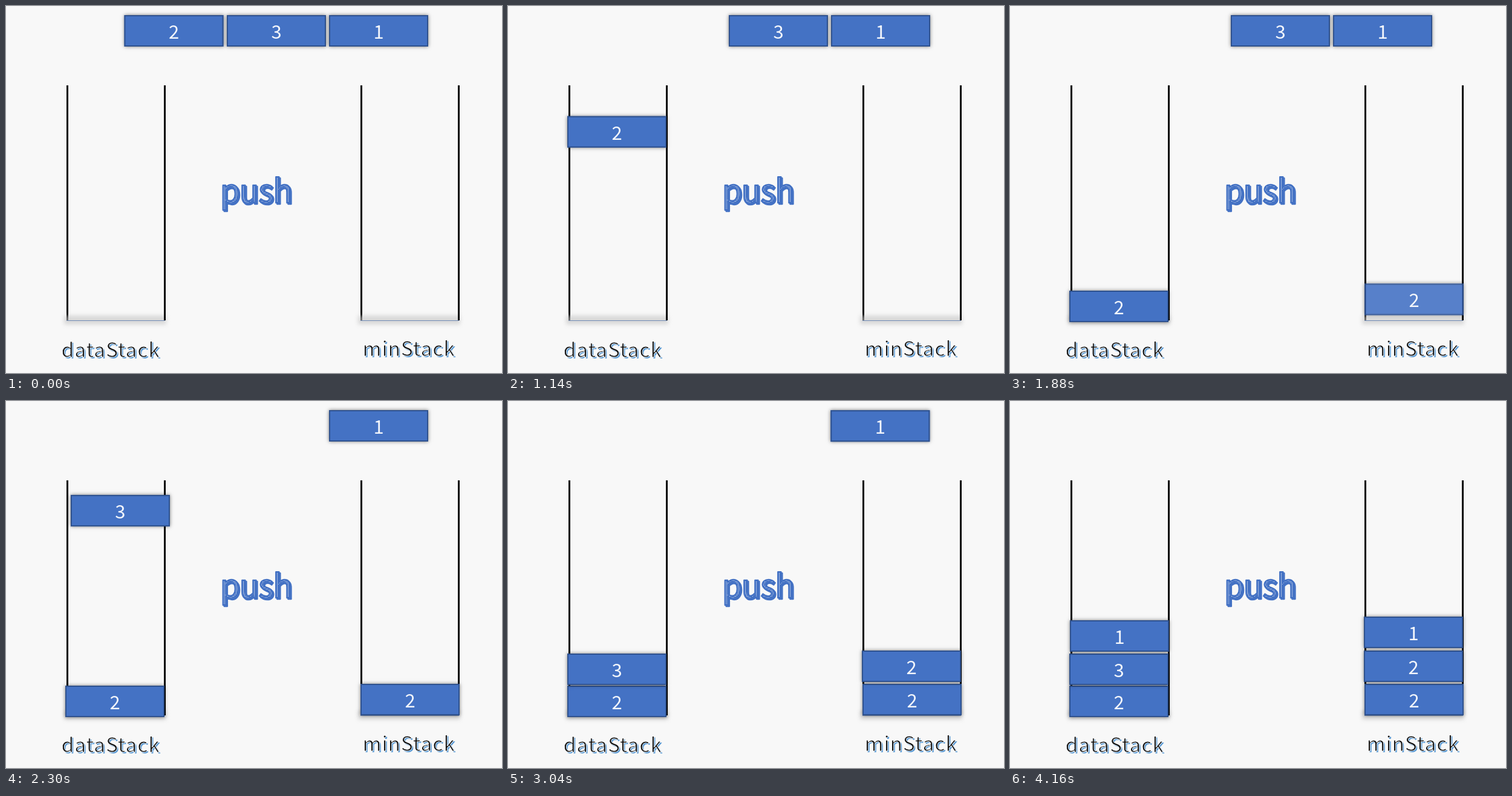
Recreate the animation shown at these times as an HTML page. Size 820 by 606 pixels, loop 5.04 s.

```html
<!DOCTYPE html>
<html lang="en">
<head>
<meta charset="utf-8">
<title>Min stack push</title>
<style>
  html, body { margin: 0; width: 100%; height: 100%; overflow: hidden; background: #f8f8f8; }
  body { position: relative; font-family: "Noto Sans CJK SC", "Noto Sans CJK JP", "Noto Sans", sans-serif; }
  svg { position: absolute; left: 0; top: 0; display: block; }

  .block {
    position: absolute; left: 0; top: 0; width: 164px; height: 52px;
    box-sizing: border-box; border: 2px solid #2f528f; background: #4472c4;
    box-shadow: 0 0 6px rgba(0, 0, 0, .5);
    color: #f4f7fc; font-size: 31px; font-weight: 300; line-height: 48px; text-align: center;
    animation: 5040ms linear infinite both;
  }

  /* Data blocks slide towards the stack, then drop down inside it:
     constant acceleration up to half way, then constant braking. */
  .data { offset-anchor: 0 0; offset-rotate: 0deg; }
  .d1 { offset-path: path("M195.5 15 L98 130 L98 470"); animation-name: data1; }
  .d2 { offset-path: path("M365 15 L98 160 L98 417"); animation-name: data2; }
  .d3 { offset-path: path("M534 15 L99 160 L99 362"); animation-name: data3; }

  @keyframes data1 {
    0% { offset-distance: 0%; }
    15.97% { offset-distance: 0%; animation-timing-function: cubic-bezier(.3333, 0, .6667, .3333); }
    23.31% { offset-distance: 50%; animation-timing-function: cubic-bezier(.3333, .6667, .6667, 1); }
    30.65%, 100% { offset-distance: 100%; }
  }
  @keyframes data2 {
    0% { offset-distance: 0%; }
    38.13% { offset-distance: 0%; animation-timing-function: cubic-bezier(.3333, 0, .6667, .3333); }
    45.48% { offset-distance: 50%; animation-timing-function: cubic-bezier(.3333, .6667, .6667, 1); }
    52.82%, 100% { offset-distance: 100%; }
  }
  @keyframes data3 {
    0% { offset-distance: 0%; }
    60% { offset-distance: 0%; animation-timing-function: cubic-bezier(.3333, 0, .6667, .3333); }
    67.34% { offset-distance: 50%; animation-timing-function: cubic-bezier(.3333, .6667, .6667, 1); }
    74.68%, 100% { offset-distance: 100%; }
  }

  /* Min blocks float down while fading in. */
  .m1 { left: 586px; top: 467px; animation-name: min1; }
  .m2 { left: 585px; top: 412px; animation-name: min2; }
  .m3 { left: 585px; top: 356px; animation-name: min3; }
  @keyframes min1 {
    0%, 30.71% { opacity: 0; transform: translateY(-85px); }
    38.06%, 100% { opacity: 1; transform: none; }
  }
  @keyframes min2 {
    0%, 52.9% { opacity: 0; transform: translateY(-85px); }
    60.24%, 100% { opacity: 1; transform: none; }
  }
  @keyframes min3 {
    0%, 75% { opacity: 0; transform: translateY(-85px); }
    82.34%, 100% { opacity: 1; transform: none; }
  }

  .label { font-size: 33.6px; letter-spacing: .85px; }
  .label .back { fill: #5b9bd5; }
  .label .front { fill: #111; stroke: #fff; stroke-width: .9; }
  .push { font-size: 53px; letter-spacing: -.8px; stroke: #4472c4; stroke-width: 2.6; stroke-linejoin: round; }
</style>
</head>
<body>
<svg width="820" height="606" viewBox="0 0 820 606">
  <defs>
    <filter id="soft" x="-20%" y="-150%" width="140%" height="400%">
      <feGaussianBlur stdDeviation="3"/>
    </filter>
    <pattern id="dots" width="2" height="2" patternUnits="userSpaceOnUse">
      <rect width="2" height="2" fill="#4472c4"/>
      <rect width="1" height="1" fill="#fff"/>
    </pattern>
    <g id="stack">
      <rect x="0" y="131" width="3" height="388"/>
      <rect x="-4" y="511" width="169" height="15" fill="#c4c4c4" opacity=".6" filter="url(#soft)"/>
      <rect x="0" y="519" width="163" height="1" fill="#6f8ab5"/>
      <rect x="161" y="131" width="3" height="388"/>
    </g>
  </defs>

  <use href="#stack" x="100"/>
  <use href="#stack" x="586"/>

  <g class="push">
    <text x="356" y="327" fill="#4472c4">push</text>
    <text x="354" y="325" fill="url(#dots)">push</text>
  </g>
  <g class="label">
    <text class="back" x="93.5" y="582">dataStack</text>
    <text class="front" x="91.5" y="580">dataStack</text>
    <text class="back" x="591.5" y="579.5">minStack</text>
    <text class="front" x="589.5" y="577.5">minStack</text>
  </g>
</svg>

<div class="block data d1">2</div>
<div class="block data d2">3</div>
<div class="block data d3">1</div>
<div class="block min m1">2</div>
<div class="block min m2">2</div>
<div class="block min m3">1</div>
</body>
</html>
```
